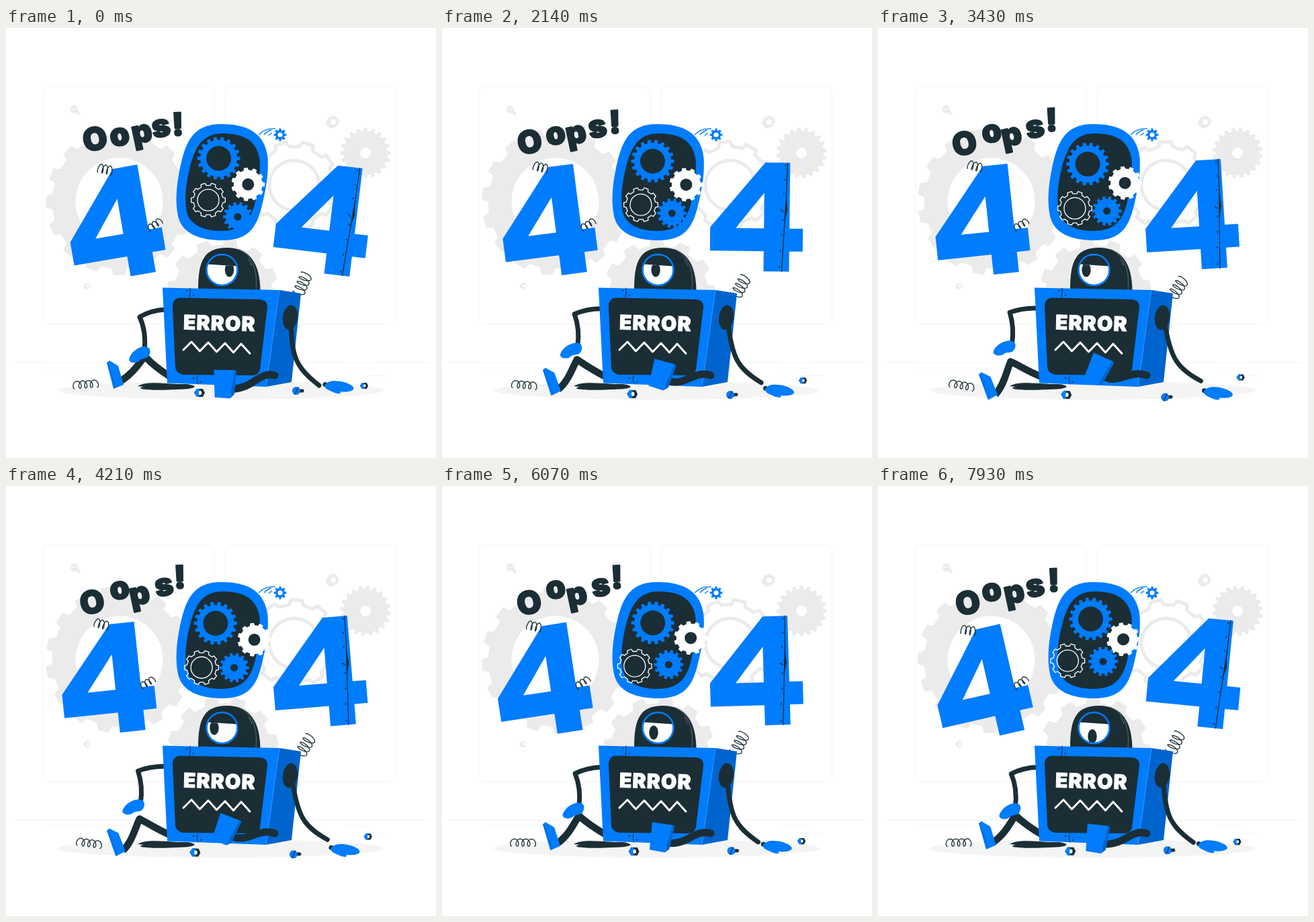
Recreate the animation shown at these times as an HTML page. Size 640 by 640 pixels, loop 8000 ms.

```html
<!DOCTYPE html>
<html lang="en">
<head>
<meta charset="utf-8">
<title>404</title>
<style>
  html, body { margin: 0; height: 100%; overflow: hidden; background: #fff; }
  svg { display: block; width: 100vw; height: 100vh; }
  text { font-family: Inter, "Liberation Sans", sans-serif; font-weight: 900; text-anchor: middle; stroke-linejoin: round; }
  .blue { fill: #007cff; }
  .shade { fill: #0064ce; }
  .dark { fill: #1b2e35; }
  .white { fill: #fff; }
  .pale { fill: #ebebeb; }
  .line { fill: none; stroke: #1b2e35; stroke-linecap: round; stroke-linejoin: round; }
  .thin { stroke-width: 1.3; }
</style>
</head>
<body>
<svg viewBox="0 0 640 640">
  <defs>
    <path id="four" class="blue" fill-rule="evenodd"
      d="M-37-162H0V-64H20V-30H0V0H-38V-30H-118V-65ZM-38-117L-80-64H-38Z"/>
    <g id="nut">
      <path class="dark" d="M-8 0L-4-6H5L8 0L5 6H-4Z"/>
      <path class="blue" d="M-8 0L-4-6H-1L3 0L-1 6H-4Z"/>
      <ellipse class="white" cx="1" rx="2.3" ry="3"/>
    </g>
    <clipPath id="eyeWhite"><path d="M298 351.500L345 354.500V384H298Z"/></clipPath>
    <clipPath id="eyeRound"><circle cx="321.5" cy="360" r="22"/></clipPath>
  </defs>

  <g fill="none" stroke="#f4f4f4">
    <rect x="55" y="87.5" width="255" height="353" rx="8"/>
    <rect x="326" y="87.5" width="254.5" height="353" rx="8"/>
    <path d="M8 497.5H631M62 506H190M505 506H545M535 517.5H567"/>
  </g>
  <g id="backGears"></g>
  <g class="pale">
    <circle cx="101.5" cy="121" r="5.8"/>
    <path d="M104 125l4-2 3 5-4 2ZM480 133l9-3 7 7-3 9-10 4-8-7ZM117 381l5-2 4 4-2 5-5 1-4-4Z"/>
    <circle class="white" cx="487" cy="140" r="4"/>
    <circle class="white" cx="122" cy="384" r="2"/>
    <path d="M97 122l9-2" stroke="#fff"/>
  </g>
  <ellipse cx="319.5" cy="539.5" rx="242.5" ry="13.5" fill="#f4f4f4"/>

  <path class="blue" d="M320 143C282 143 270 165 262 195C254 228 251 255 256 280C262 307 290 316 322 316C358 316 372 300 380 268C388 236 391 215 389.5 193C385 155 358 143 320 143Z"/>
  <path class="dark" d="M322 157C293 157 283 176 275 202C268 230 265 252 269 274C274 294 296 302 320 302C348 302 362 291 370 263C376 236 379 215 377.500 196C373 166 352 157 322 157Z"/>
  <g id="zeroGears"></g>
  <g id="flyingGear"></g>
  <path d="M376 159Q385 149 401 150M384 159Q389 153 395 152M391 160L396 156" fill="none" stroke="#007cff" stroke-width="1.3"/>

  <g id="leftFour"><use href="#four"/></g>
  <g id="rightFour">
    <use href="#four"/>
    <path class="line thin" d="M-4-162L-5-115L-7-80L-11 0M-9-89L-13-92"/>
    <path class="dark" d="M-5-112L-3-92L-8-72Z"/>
    <path class="line" stroke-width="2.2" d="M-7-158v0M-8-137v0M-9-116v0M-10-77v0M-11-54v0M-13-31v0M-14-6v0"/>
  </g>
  <g id="letters" class="dark" font-size="47" stroke="#1b2e35" stroke-width="2"></g>

  <g id="coilRight"></g>
  <g id="coilFloor"></g>
  <path class="dark" d="M196 533C212 524 242 531 268 530C288 532 285 538 253 538C226 540 186 538 205 534Z"/>
  <path id="leftLeg" class="line" stroke-width="10.5" style="stroke-linecap:butt"/>
  <g id="leftFoot">
    <path class="blue" d="M-12-20L-8-23L5-15L13 13L-2 19Z"/>
    <path d="M-11-20L1 18" stroke="#0064ce"/>
  </g>
  <path id="leftArm" class="line" stroke-width="7"/>
  <path id="leftHand" class="blue" d="M-16 8C-15 0-6-10 6-12C16-13 18-4 13 3C9 7 3 5 0 9C-4 13-14 14-16 8Z"/>

  <path class="dark" d="M286 389C286 346 295 327 329 327C364 327 378 352 378.500 391Z"/>
  <path d="M347 330C366 338 375 360 372 390M361 344l5 10" fill="none" stroke="#5a6b72"/>
  <g clip-path="url(#eyeRound)">
    <g clip-path="url(#eyeWhite)">
      <circle class="white" cx="321.5" cy="360" r="23"/>
      <ellipse id="pupil" class="dark" rx="6.7" ry="10.5"/>
    </g>
  </g>
  <circle cx="321.5" cy="360" r="23" fill="none" stroke="#007cff" stroke-width="2.5"/>

  <path class="shade" d="M407 390L439 395L425 527L387 534Z"/>
  <path class="blue" d="M233 386.500L407 390L387 534L240 528.500Z"/>
  <path d="M407 390L387 534" stroke="#3498ff" stroke-width=".7"/>
  <path class="dark" d="M259 401.500L378 404Q390 405 389 416L378 508Q376 517 366 517L264 516Q253 514 252 505L248 414Q248 402 259 401.500Z"/>
  <path class="line" stroke-width="1" d="M274 387V394L273 402M285 517L284 524L286 530"/>
  <path class="line" stroke-width="2.2" d="M269 391v0M279 398v0M279 521v0M290 527v0"/>
  <text class="white" font-size="30" letter-spacing="1.2" stroke="#fff" transform="translate(317.5 450) rotate(1.5)">ERROR</text>
  <path d="M264 479L276 467L288.500 481L301 468L313.500 482L326 469L338.500 483L350 470L363 484.500" fill="none" stroke="#fff" stroke-width="3" stroke-linecap="round" stroke-linejoin="round"/>

  <path id="rightLeg" class="line" stroke-width="11"/>
  <g id="rightFoot">
    <path class="shade" d="M14-21L17-20L14 15L8 21Z"/>
    <path class="blue" d="M-17-21H14L8 21L-15 20Z"/>
  </g>
  <ellipse class="dark" rx="11" ry="18.5" transform="translate(423 431) rotate(8)"/>
  <path id="rightArm" class="line" stroke-width="7"/>
  <g id="rightHand">
    <circle class="dark" cx="-20" cy="-3.5" r="3.5"/>
    <path class="blue" d="M-21-2C-16-10-4-10 8-7C18-4 24 0 22 4C18 8 8 8 2 7C6 11-2 11-8 8C-14 5-20 4-21-2Z"/>
  </g>
  <g id="screw">
    <path class="line" stroke-width="5" d="M2 0H9"/>
    <circle class="blue" r="6"/>
    <path class="line thin" d="M-2 5L3-5"/>
  </g>
  <use id="nutLeft" href="#nut"/>
  <use id="nutRight" href="#nut"/>
</svg>
<script>
const $ = id => document.getElementById(id);
const LOOP = 8, SWAY = 7.14, DRIFT = 10; // seconds

function add(parent, tag, attrs = {}) {
  const el = document.createElementNS('http://www.w3.org/2000/svg', tag);
  for (const key in attrs) el.setAttribute(key, attrs[key]);
  return parent.appendChild(el);
}

function addGear(parent, teeth, tip, root, hole, attrs) {
  const points = [];
  for (let i = 0; i < teeth; i++) {
    for (const [r, offset] of [[root, -.29], [tip, -.2], [tip, .2], [root, .29]]) {
      const angle = (i + offset) / teeth * 2 * Math.PI;
      points.push((r * Math.cos(angle)).toFixed(2) + ' ' + (r * Math.sin(angle)).toFixed(2));
    }
  }
  const arc = `A${hole} ${hole} 0 1 0 `;
  const d = `M${points.join('L')}ZM${hole} 0${arc}${-hole} 0${arc}${hole} 0Z`;
  return add(parent, 'path', { d, 'fill-rule': 'evenodd', ...attrs });
}

function addCoil(parent, turns, length, height, transform = '') {
  const points = [];
  for (let i = 0; i <= turns * 16; i++) {
    const u = i / (turns * 16), angle = 2 * Math.PI * turns * u;
    points.push((length * (u - .11 * Math.sin(angle))).toFixed(1) + ' ' +
                (-height * (1 - Math.cos(angle)) / 2).toFixed(1));
  }
  add(parent, 'path', { d: 'M' + points.join('L'), class: 'line thin', transform });
}

// Slow swing around a middle value, highest at the time `peak`, plus a steady speed.
const swing = (middle, amount, peak, speed = 0) => t =>
  middle + amount * Math.cos(2 * Math.PI * (t - peak) / DRIFT) + speed * t;
const glide = (from, speed) => t => from + speed * t;
const still = value => () => value;

function ease(t, from, to) {
  const u = Math.min(Math.max((t - from) / (to - from), 0), 1);
  return u * u * (3 - 2 * u);
}

// Blends the numbers in two strings of the same form.
function morph(from, to, amount) {
  const ends = to.match(/-?[\d.]+/g);
  let i = 0;
  return from.replace(/-?[\d.]+/g, n => (+n + (ends[i++] - n) * amount).toFixed(2));
}

const movers = [];
const move = (el, x, y, angle = still(0)) => movers.push({ el, x, y, angle });

const outline = (color, width) => ({ fill: 'none', stroke: color, 'stroke-width': width, 'stroke-linejoin': 'round' });
const pale = { class: 'pale' }, blue = { class: 'blue' };

const back = $('backGears');
move(addGear(back, 16, 109.5, 100, 65, pale), still(168.5), still(258.5), glide(0, 3));
move(addGear(back, 12, 84, 74, 30, pale), still(323), still(397), glide(8, -5));
move(addGear(back, 10, 65, 58, 37, outline('#ebebeb', 5)), still(429), still(234), glide(0, 5));
move(addGear(back, 20, 37.5, 33, 8, pale), still(535), still(186), glide(0, -3));

const zero = $('zeroGears');
move(addGear(zero, 18, 32, 27.5, 18.5, blue), swing(314.5, 2.6, 9), swing(199.5, 5.5, 5));
const whiteGear = add(zero, 'g');
add(whiteGear, 'circle', { r: 9.5, class: 'dark' });
addGear(whiteGear, 11, 25, 21.5, 9, { class: 'white' });
move(whiteGear, swing(365.5, 5.3, 5.3), swing(230, 3.8, 1.2));
move(addGear(zero, 10, 25.5, 22, 16, outline('#fff', 1.3)), glide(301, -2.35), swing(263.3, 7.3, 4.7));
move(addGear(zero, 14, 22, 18, 5.5, blue), glide(345, -1.26), glide(281, -2.5));

addGear($('flyingGear'), 8, 9.5, 7, 3.6, { ...blue, transform: 'translate(408 159)' });

move($('leftFour'), swing(215, 8, 9.8), still(363), swing(-7, 3.1, 4.3, -.5));
move($('rightFour'), swing(516, 5, 4.5), swing(363, 7, 9.8, -.5), swing(.9, 6.3, 9.5, .15));

addCoil($('leftFour'), 3, 20, 13, 'translate(-60 -161) rotate(22)');
addCoil($('leftFour'), 3, 21, 10, 'translate(3 -61) rotate(-24)');
addCoil($('coilRight'), 4, 30, -18);
addCoil($('coilFloor'), 4, 34, 11);

function addLetter(glyph, tilt, baseline, x, y) {
  const el = add($('letters'), 'text', { y: baseline });
  el.textContent = glyph;
  move(el, x, y, still(tilt));
}
addLetter('O', -12, 17, swing(129.2, 3, 9.8, .4), swing(166.3, 1.7, 4, 1.1));
addLetter('o', -10, 13, still(169.3), swing(158, 4.2, .5));
addLetter('p', -12, 8, swing(202, 2.2, 8.7), swing(165.5, 3.5, 5.5));
addLetter('s', -9, 13, swing(233.5, 3, 5.7), glide(149, .3));
addLetter('!', -2, 17, glide(255.5, .75), swing(138.8, 4.2, 0));

// The eye looks right, then left, then down.
move($('pupil'),
  t => 332.5 - 22.5 * ease(t, .3, 3.4) + 9 * ease(t, 5.1, 6.9),
  t => 360 + 12.5 * ease(t, 5.1, 6.9));

// id, attribute, resting form, form at the far end of the sway
const swaying = [
  ['leftLeg', 'd', 'M170 526C190 514 200 496 207 488C212 496 230 510 246 520', 'M175 546C187 534 192 508 197 497C206 500 228 514 246 520'],
  ['leftFoot', 'transform', 'translate(162 518) rotate(0)', 'translate(164 535) rotate(-6)'],
  ['leftArm', 'd', 'M238 419Q216 420 199 430Q209 452 206 480', 'M238 417Q216 416 196 423Q203 446 199 470'],
  ['leftHand', 'transform', 'translate(199 486) rotate(0)', 'translate(188 476) rotate(8)'],
  ['rightLeg', 'd', 'M400 517C386 513 376 522 366 528C355 535 345 537 335 538', 'M400 517C386 512 376 516 362 520C350 524 340 521 334 517'],
  ['rightFoot', 'transform', 'translate(326 530) rotate(1)', 'translate(328 508.5) rotate(25)'],
  ['rightArm', 'd', 'M424 440C426 490 431 505 466 532', 'M427 440C436 492 446 507 481 525'],
  ['rightHand', 'transform', 'translate(495 534)', 'translate(506 543.5)'],
  ['coilRight', 'transform', 'translate(427 391) rotate(-66)', 'translate(431 395) rotate(-57)'],
  ['coilFloor', 'transform', 'translate(102 537) rotate(-4)', 'translate(107 534) rotate(11)'],
  ['screw', 'transform', 'translate(432 540) rotate(0)', 'translate(427 550) rotate(-4)'],
  ['nutLeft', 'transform', 'translate(288 543) rotate(0)', 'translate(280 546) rotate(4)'],
  ['nutRight', 'transform', 'translate(533 532.5) scale(.76)', 'translate(540 519.5) scale(.76)']
];

function draw(t) {
  const sway = 1 - Math.abs(1 - 2 * (t % SWAY) / SWAY);
  for (const [id, attr, from, to] of swaying) $(id).setAttribute(attr, morph(from, to, sway));
  for (const { el, x, y, angle } of movers) {
    el.setAttribute('transform',
      `translate(${x(t).toFixed(2)} ${y(t).toFixed(2)}) rotate(${angle(t).toFixed(2)})`);
  }
}

const start = performance.now();
function tick() {
  draw((performance.now() - start) / 1000 % LOOP);
  requestAnimationFrame(tick);
}
tick();
</script>
</body>
</html>
```
